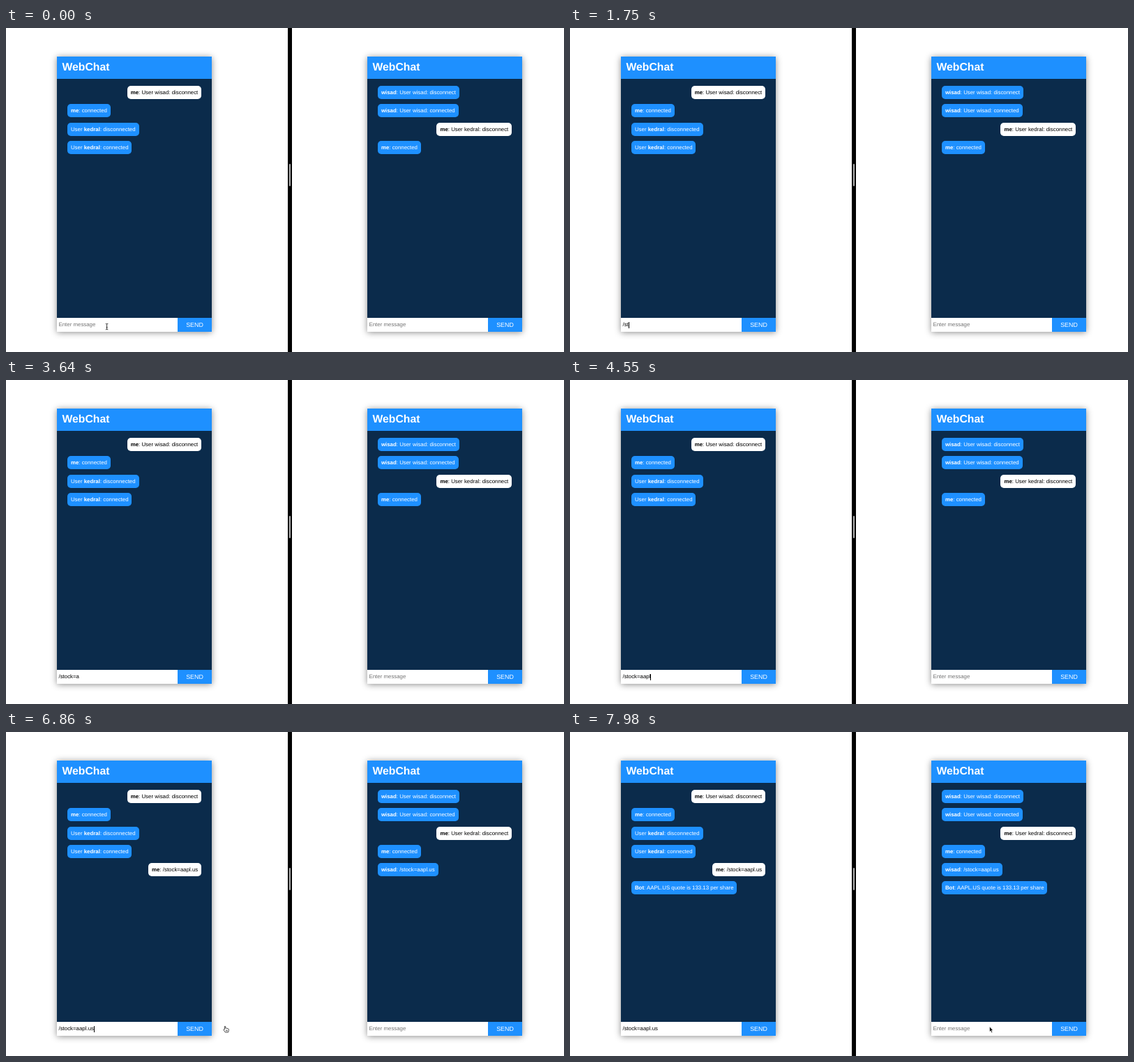
These frames come from a looping animation (800 by 465 pixels, 8 s). An HTML page:

```html
<!DOCTYPE html>
<html lang="en">
<head>
<meta charset="utf-8">
<title>WebChat</title>
<style>
  html, body { margin: 0; width: 100%; height: 100%; overflow: hidden; background: #fff; }
  body {
    position: relative;
    font: 7.87px "Liberation Sans", Arial, sans-serif;
    text-rendering: geometricPrecision;
    white-space: pre;
  }
  body *, .chat { position: absolute; }
  b { position: static !important; }
  .chat {
    top: 40.7px; width: 222px; height: 395.3px;
    background: #0b2b4b;
    box-shadow: 0 1px 9px rgba(0, 0, 0, .45);
  }
  .title {
    left: 0; top: 0; width: 214.5px; height: 32.5px; padding-left: 7.5px;
    background: #1e90ff; color: #fff;
    font-size: 15.75px; font-weight: bold; line-height: 32.5px;
  }
  .bubble {
    left: 15px; height: 19px; padding: 0 4.95px; border-radius: 5px;
    background: #1e90ff; color: #fff; line-height: 19px;
  }
  .bubble.own { left: auto; right: 14.8px; background: #fff; color: #000; }
  .input, .send { top: 375.8px; height: 19.5px; line-height: 20px; }
  .input { left: 0; width: 170.5px; padding-left: 2.5px; background: #fff; }
  .empty { color: #757575; }
  .send { left: 173px; width: 49px; background: #1e90ff; color: #fff; font-size: 8.9px; text-align: center; }
  .divider { left: 404px; top: 0; width: 6px; height: 465px; background: #000; }
  .grip { left: 2px; top: 195px; width: 2px; height: 32px; border-radius: 1px; background: #b4b4b4; }
  .caret { top: 422px; width: 1px; height: 9px; background: #000; }
  svg { left: 0; top: 0; }
</style>
</head>
<body>
<div class="divider"><div class="grip"></div></div>
<div class="caret" id="caret"></div>
<svg width="800" height="465">
  <path id="beam" d="M-1.7-4.2Q0-4.2 0-3.2Q0-4.2 1.7-4.2M0-3.2V3.4M-1.7 4.4Q0 4.4 0 3.4Q0 4.4 1.7 4.4M-1 1.2H1"
        fill="none" stroke="#222" stroke-width=".9"/>
  <path id="hand" d="M-1.2.6Q-.5-.4.2.6V3.2L1.3 3 2.5 3.3 3.7 3.7 4.8 4.4V6.6L4 9H-.2L-2.6 5.4Q-2.4 4.2-1.2 5Z M1.2 5.6V7.6M2.6 5.6V7.6"
        fill="#fff" stroke="#222" stroke-width=".8" stroke-linejoin="round"/>
  <path id="arrow" d="M0 0V7.4L1.6 6 2.8 8.8 4.1 8.2 2.9 5.5H5Z"
        fill="#000" stroke="#fff" stroke-width=".6"/>
</svg>
<script>
const LOOP = 8000, STEP = 70;
const SENT = 5880, REPLIED = 7210;
const COMMAND = "/stock=aapl.us";
const KEY_TIMES = [700, 1400, 1750, 1890, 2030, 2310, 2730, 3150, 4060, 4270, 4550, 5110, 5390, 5670];
const CARET_OFF = [[0, 700], [1190, 1400], [3640, 4060], [5040, 5110], [6160, 6720], [7070, 7560], [7980, LOOP]];
const MOUSE = [[6720, 170], [6790, 250], [6860, 314.5], [7350, 640], [7840, 601.5]];
const REPLY = "<b>Bot</b>: AAPL.US quote is 133.13 per share";

const $ = id => document.getElementById(id);
const timed = [];

function add(parent, className, html) {
  const el = document.createElement("div");
  el.className = className;
  el.innerHTML = html;
  parent.append(el);
  return el;
}

// Each message is [html, own, time of arrival].
function addChat(left, messages) {
  const chat = document.createElement("div");
  chat.className = "chat";
  chat.style.left = left + "px";
  document.body.prepend(chat);
  add(chat, "title", "WebChat");
  messages.forEach(([html, own, at = 0], i) => {
    const el = add(chat, own ? "bubble own" : "bubble", html);
    el.style.top = 42.5 + 26.25 * i + "px";
    timed.push({ el, at });
  });
  add(chat, "send", "SEND");
  return add(chat, "input empty", "Enter message");
}

const input = addChat(73, [
  ["<b>me</b>: User wisad: disconnect", true],
  ["<b>me</b>: connected"],
  ["User <b>kedral</b>: disconnected"],
  ["User <b>kedral</b>: connected"],
  ["<b>me</b>: " + COMMAND, true, SENT],
  [REPLY, false, REPLIED]
]);
addChat(518, [
  ["<b>wisad</b>: User wisad: disconnect"],
  ["<b>wisad</b>: User wisad: connected"],
  ["<b>me</b>: User kedral: disconnect", true],
  ["<b>me</b>: connected"],
  ["<b>wisad</b>: " + COMMAND, false, SENT],
  [REPLY, false, REPLIED]
]);

const show = (el, on) => { el.style.visibility = on ? "visible" : "hidden"; };
const pen = document.createElement("canvas").getContext("2d");
pen.font = '100px "Liberation Sans", Arial, sans-serif';
const textWidth = text => pen.measureText(text).width * .0787;

function mouseX(t) {
  const next = MOUSE.findIndex(([time]) => time > t);
  if (next < 0) return MOUSE[MOUSE.length - 1][1];
  if (next === 0) return MOUSE[0][1];
  const [t0, x0] = MOUSE[next - 1], [t1, x1] = MOUSE[next];
  const p = (t - t0) / (t1 - t0);
  return x0 + (x1 - x0) * p * (2 - p);
}

function render(t) {
  const typed = COMMAND.slice(0, KEY_TIMES.filter(time => time <= t).length);
  input.textContent = typed || "Enter message";
  input.classList.toggle("empty", !typed);
  $("caret").style.left = 75.3 + textWidth(typed) + "px";
  show($("caret"), !CARET_OFF.some(([from, to]) => t >= from && t < to));
  timed.forEach(({ el, at }) => show(el, t >= at));

  const x = mouseX(t);
  const beamX = t < 490 ? 144.6 : x;
  $("beam").setAttribute("transform", `translate(${beamX} 428.5)`);
  $("hand").setAttribute("transform", `translate(${x} 422)`);
  $("arrow").setAttribute("transform", `translate(${x} 422.8)`);
  show($("beam"), t < 490 || (t >= 6720 && t < 6790));
  show($("hand"), t >= 6790 && t < 6930);
  show($("arrow"), t >= 6930);
}

function frame() {
  const t = performance.now() % LOOP;
  render(Math.floor(t / STEP) * STEP);
  requestAnimationFrame(frame);
}
frame();
</script>
</body>
</html>
```
